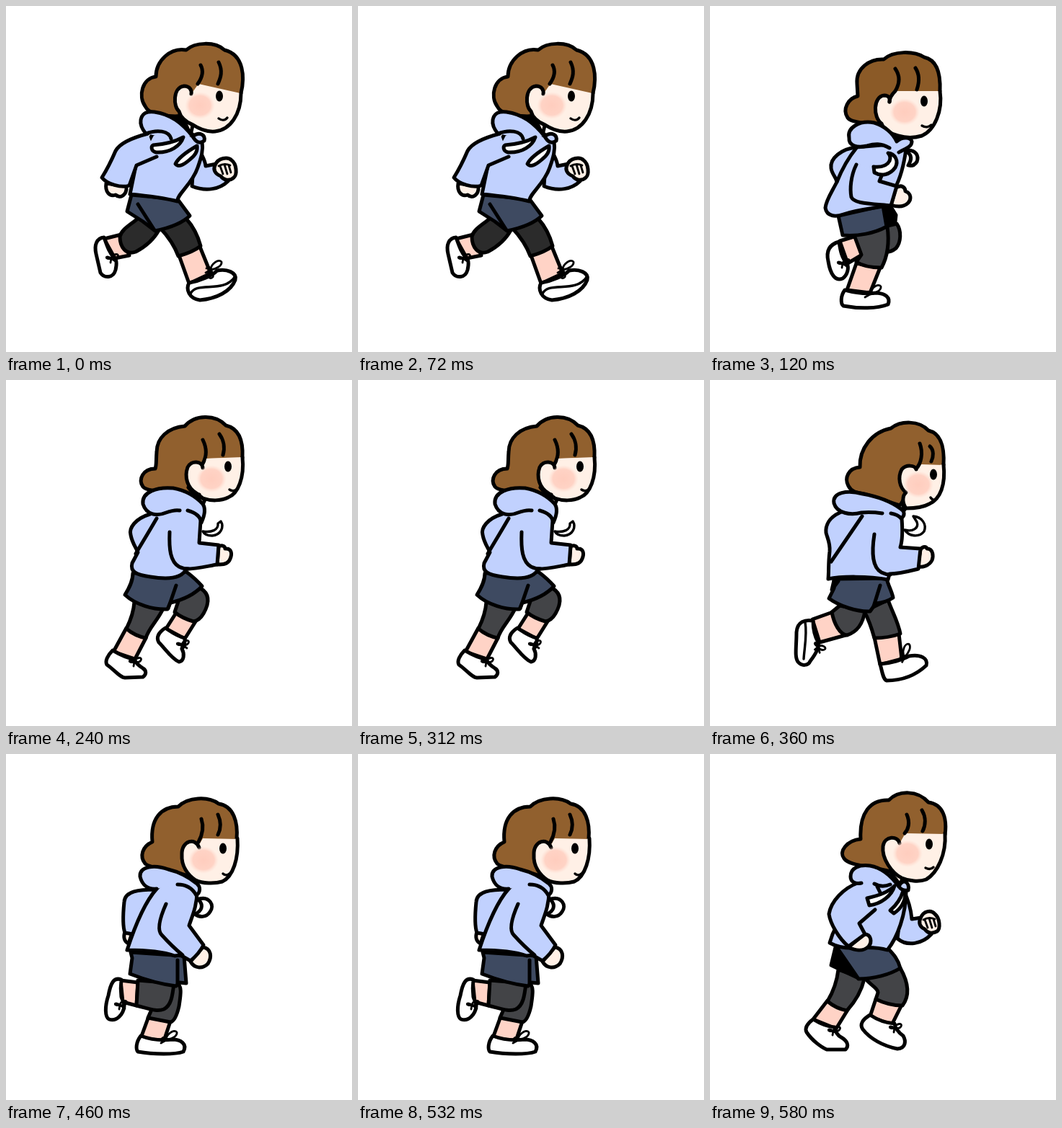
An HTML page without scripts that plays this animation: 480 px wide and 480 px high, repeating every 0.7 s.

```html
<!DOCTYPE html>
<html lang="en">
<head>
<meta charset="utf-8">
<title>Runner</title>
<style>
html, body { margin: 0; width: 100%; height: 100%; overflow: hidden; background: #fff; }
svg { display: block; width: 100vw; height: 100vh; }
path { stroke: #000; stroke-width: 5; stroke-linecap: round; stroke-linejoin: round; fill: none; }
.hair { fill: #91602e; }
.face { fill: #fff0e6; }
.skin { fill: #ffd3c6; }
.top { fill: #c1d1fe; }
.shorts { fill: #3e4a61; }
.tight { fill: #434447; }
.dark { fill: #2b2b2b; }
.black { fill: #000; }
.white { fill: #fff; }
.brow { stroke: none; fill: #fff0e6; }
.thin { stroke-width: 3.4; }
.fine { stroke-width: 2.8; }
.pose { visibility: hidden; animation: show 700ms step-end infinite; }
.short { animation-name: show-short; }
@keyframes show { 0% { visibility: visible; } 17.1429%, 100% { visibility: hidden; } }
@keyframes show-short { 0% { visibility: visible; } 14.2857%, 100% { visibility: hidden; } }
</style>
</head>
<body>
<svg viewBox="0 0 480 480">
<defs>
  <radialGradient id="blush">
    <stop offset="0" stop-color="#ffcdbe"/>
    <stop offset=".7" stop-color="#ffd3c5"/>
    <stop offset="1" stop-color="#ffe0d4" stop-opacity="0"/>
  </radialGradient>
  <ellipse id="eye" rx="5" ry="7.4"/>
  <ellipse id="cheek" rx="21" ry="19" fill="url(#blush)"/>
  <path id="lace" class="fine" d="M0 0C-9-6-9 3 0 0C2-7 12-7 9-2C7 1 3 1 0 0L-1 6M0 0L7 5"/>
  <path id="loops" class="fine" d="M-6-2C-3-5-1-4 0 0C0-8 11-16 15-11C16-6 8-1 0 0L-7 4"/>
  <path id="fingers" class="fine" d="M-1 0C4-3 10-3 15-1M1 0L5 11M7-2L11 11M13-1L16 9"/>
</defs>

<!-- long stride -->
<g class="pose" style="animation-delay:0ms">
  <path class="top" d="M262 190C270 203 276 213 277 222L292 219C294 232 299 239 308 243C297 254 278 258 258 250Z"/>
  <path class="face" d="M290 221C294 210 308 209 313 214C320 219 321 234 316 238C310 244 301 241 298 236C290 233 287 227 290 221Z"/>
  <use href="#fingers" x="296" y="222"/>
  <path class="skin" d="M160 317L136 323L151 350L171 346Z"/>
  <path class="dark" d="M184 294C172 304 160 310 158 320C158 335 167 346 180 341C195 333 206 322 212 311Z"/>
  <path class="white" d="M136 321C126 322 122 331 125 344L131 370C136 378 149 378 152 366C154 357 153 351 150 349C143 342 140 332 136 321Z"/>
  <use href="#lace" x="146" y="350"/>
  <path class="skin" d="M240 346L254 385L284 371L269 334Z"/>
  <path class="dark" d="M214 308C227 322 234 333 239 347C250 344 261 340 270 333C266 318 259 305 250 295Z"/>
  <path class="white" d="M254 384C249 393 254 406 269 408C292 406 312 396 318 380C321 370 306 364 293 367C286 374 271 381 254 384Z"/>
  <path class="thin" d="M256 399C265 381 302 400 318 375"/>
  <use href="#loops" x="284" y="366"/>
  <path class="fine" d="M284 366C276 373 283 381 287 376C289 372 286 369 284 366"/>
  <path class="shorts" d="M174 262L168 285L190 299L207 312C226 308 245 301 255 291L238 268Z"/>
  <path d="M183 275L206 311"/>
  <path class="face" d="M139 246C137 258 144 265 152 262C159 268 168 262 167 250Z"/>
  <path class="top" d="M203 178L180 222L172 261C193 263 218 266 238 271C236 262 258 248 266 224C271 210 274 200 272 188L240 164Z"/>
  <path class="top" d="M209 209L181 221L171 249C160 253 140 247 133 238C140 227 146 215 152 201C158 190 174 183 197 177"/>
  <path class="black" d="M230 146L246 150L258 180L242 162Z"/>
  <path class="face" d="M244 152L259 166L256 179Z"/>
  <path class="hair" d="M326 121C331 100 331 68 303 61C290 49 262 50 250 61C228 57 208 76 208 98C189 100 183 125 193 139C198 149 210 152 235 153L245 152"/>
  <path class="brow" d="M257 122L267 108L325 121L312 145H262Z"/>
  <path class="face" d="M326 121C326 150 311 172 290 174C279 175 267 170 258 164C249 161 242 154 240 146C232 140 231 113 247 111C255 111 258 117 257 122"/>
  <path d="M270 82C275 91 271 101 266 108M295 78C301 90 298 99 294 108"/>
  <path class="brow" d="M259 124L268 110L318 121L312 145H262Z"/>
  <use href="#cheek" x="269" y="138"/><use href="#eye" x="296" y="125"/>
  <path class="thin" d="M295 156C299 159 304 159 307 155"/>
  <path class="top" d="M194 177C189 171 186 164 187 158C189 148 196 146 206 147C228 150 244 162 259 181C268 174 277 178 275 187C268 192 263 188 259 181"/>
  <path class="top" d="M194 177C210 171 226 173 229 184"/>
  <path class="white" d="M204 193C218 192 233 189 246 182C242 194 228 204 208 203C201 201 201 195 204 193Z"/>
  <path class="white" d="M265 194C251 202 239 211 235 219C239 224 246 221 255 213C263 207 266 200 265 194Z"/>
</g>

<!-- low, knees together -->
<g class="pose" style="animation-delay:-580ms">
  <path class="tight" d="M242 306L259 302C266 312 265 328 258 336C252 341 246 342 240 341Z"/>
  <path class="skin" d="M180 326L203 319L211 345L191 357Z"/>
  <path class="white" d="M179 327C165 331 161 341 164 354C167 373 174 382 184 378C191 373 193 363 190 357C183 350 181 340 179 327Z"/>
  <use href="#lace" x="184" y="357"/>
  <path class="skin" d="M203 357L190 394L222 398L236 363Z"/>
  <path class="tight" d="M200 318L210 345L203 355C212 361 225 363 238 363C246 348 249 328 246 306Z"/>
  <path class="white" d="M187 394C181 402 181 413 185 416C206 420 232 420 247 414C251 404 243 399 231 398C215 400 202 398 187 394Z"/>
  <use href="#loops" x="222" y="400"/>
  <path class="black" d="M240 278L250 277L258 290L257 299L244 306Z"/>
  <path class="shorts" d="M178 291L184 318C205 320 229 315 245 306L240 277Z"/>
  <path class="face" d="M258 252C266 247 271 252 271 257C280 260 279 269 275 273C268 280 257 278 251 276Z"/>
  <path class="top" d="M203 196C183 198 166 211 168 225C169 233 175 238 176 244C169 258 161 269 160 280C162 292 174 293 185 289C206 282 226 281 245 277L259 248C265 235 270 218 273 190Z"/>
  <path d="M203 197C190 213 182 229 176 244"/>
  <path class="top" d="M203 220C195 236 194 254 196 265C200 274 218 274 251 277L259 250L235 243L239 233"/>
  <path class="face" d="M238 164L261 180L257 190Z"/>
  <path class="hair" style="fill:#8b5a27" d="M319 118C320 95 316 75 297 71C283 62 254 62 241 74C222 73 202 86 204 108L205 125C192 128 183 143 191 155C196 162 213 161 240 168"/>
  <path class="brow" d="M249 133L257 118L318 118L308 145H255Z"/>
  <path class="face" d="M319 118C323 145 312 172 294 180C284 183 271 183 261 180C249 177 240 170 238 163C226 155 226 125 242 124C248 124 250 128 249 133"/>
  <path d="M257 87C264 97 263 108 257 118C252 123 249 127 249 133M285 86C291 95 290 107 287 116"/>
  <path class="brow" d="M253 133L260 119L312 119L308 145H255Z"/>
  <use href="#cheek" x="270" y="147"/><use href="#eye" x="297" y="132"/>
  <path class="thin" d="M294 166C299 169 304 168 307 165"/>
  <path class="top" d="M249 197C237 190 228 191 218 194C204 197 192 194 193 183C190 169 207 158 228 162C242 166 254 177 259 188C268 180 279 183 280 188C280 196 270 198 262 203"/>
  <path class="white" d="M274 200C286 200 290 208 287 216C283 222 278 222 275 221C280 213 280 207 274 203Z"/>
  <path class="white" d="M247 204C257 205 262 215 257 224C250 234 238 237 228 231L227 223C238 224 246 221 249 215C251 210 250 207 247 204Z"/>
</g>

<!-- pushing off -->
<g class="pose" style="animation-delay:-460ms">
  <path class="skin" d="M236 323L222 345L248 359L263 335Z"/>
  <path class="tight" d="M270 289C283 297 282 310 274 324C270 331 266 334 260 335C250 332 241 328 234 322L240 304Z"/>
  <path class="white" d="M221 344C212 350 208 357 212 364C222 374 230 387 240 391C247 390 248 380 244 373C249 367 248 362 248 358C238 356 230 350 221 344Z"/>
  <use href="#lace" x="244" y="367"/>
  <path class="skin" d="M167 344L149 377L179 387L194 358Z"/>
  <path class="tight" d="M178 308C177 323 172 335 167 345C174 351 184 356 194 358C198 344 211 333 218 317Z"/>
  <path class="white" d="M148 375C141 382 137 390 140 395C150 402 159 413 165 413L190 412C195 408 195 403 190 400C184 396 180 393 178 387C169 386 158 381 148 375Z"/>
  <use href="#lace" x="178" y="391"/>
  <path class="shorts" d="M176 268C176 280 170 290 165 298C180 312 205 319 224 318L228 309C245 305 262 297 272 286C265 278 258 272 250 266Z"/>
  <path d="M236 285L225 317"/>
  <path class="face" d="M295 231C300 228 304 231 304 234C313 233 314 241 311 248C308 256 300 256 293 256Z"/>
  <path class="top" d="M200 186C180 192 170 205 173 215C175 226 180 232 183 239L175 254C172 266 180 270 200 273C224 277 244 276 250 262C265 262 280 258 293 256L295 229L268 226L270 195L268 173L215 165Z"/>
  <path d="M209 192C198 211 187 229 180 241M227 211C226 235 228 252 240 259C244 261 248 262 253 262"/>
  <path class="face" d="M262 158L276 166L272 175Z"/>
  <path class="hair" d="M328 108C329 90 326 68 305 63C290 47 262 48 248 64C225 66 209 80 209 100C208 112 209 118 207 123C190 123 183 138 190 148C196 156 230 154 266 161"/>
  <path class="brow" d="M272 122L277 109L327 107L318 135H275Z"/>
  <path class="face" d="M328 107C331 135 322 158 308 163C298 168 284 168 273 164L264 157C252 150 247 135 252 121C257 111 272 112 273 122"/>
  <path d="M253 149C257 155 261 157 268 159"/>
  <path d="M273 83C279 95 278 107 273 116M296 75C302 83 304 94 301 104"/>
  <path class="brow" d="M276 122L278 109L321 108L318 135H275Z"/>
  <use href="#cheek" x="285" y="137"/><use href="#eye" x="308" y="120"/>
  <path class="thin" d="M310 152C313 154 317 154 320 152"/>
  <path class="top" d="M252 181C263 184 270 190 271 198C276 187 277 178 273 172C262 160 248 153 232 150C210 148 188 155 190 172C195 188 210 189 222 184C230 181 236 180 241 181"/>
  <path class="white thin" d="M298 196C303 204 298 215 286 216C280 216 275 214 273 210C285 212 295 208 294 199Z"/>
</g>

<!-- reaching stride -->
<g class="pose short" style="animation-delay:-340ms">
  <path class="skin" d="M170 322L142 332L152 364L188 354Z"/>
  <path class="tight" d="M180 313L169 322C172 338 180 353 190 354C203 350 212 340 215 320Z"/>
  <path class="white" d="M143 334C132 332 121 335 120 350C120 370 117 384 122 391C127 397 136 397 139 390C146 381 152 371 150 364C145 355 143 345 143 334Z"/>
  <path class="thin" d="M132 336C135 353 131 371 130 387"/>
  <use href="#lace" x="150" y="370" transform="rotate(40 150 370)"/>
  <path class="skin" d="M228 357L236 395L266 387L262 352Z"/>
  <path class="tight" d="M214 321C221 334 225 347 228 358C240 358 253 356 264 352C261 335 252 320 247 305Z"/>
  <path class="white" d="M236 394C239 405 240 415 245 417C265 417 285 410 300 396C303 386 292 380 276 383C267 388 251 393 236 394Z"/>
  <use href="#loops" x="270" y="384" transform="rotate(-35 270 384)"/>
  <path class="shorts" d="M172 276L172 289L165 303C180 314 205 322 222 321L230 310C240 309 248 306 254 302C252 292 247 285 245 275Z"/>
  <path class="black" d="M172 278L178 279L169 291Z"/>
  <path d="M236 285L227 314"/>
  <path class="face" d="M292 235C296 230 300 231 301 234C310 234 310 245 308 250C304 258 295 260 288 259Z"/>
  <path class="top" d="M180 184C165 191 160 202 161 212C163 220 167 226 166 238C164 254 165 265 164 276C182 272 220 272 247 277L249 269C263 269 277 265 289 262L292 234L264 232C268 220 267 205 266 192L262 181L210 172Z"/>
  <path d="M211 189L168 252M228 214C224 240 225 260 238 267C242 269 246 270 250 270"/>
  <path class="face" d="M268 158L273 175L268 183Z"/>
  <path class="hair" d="M324 118C325 100 324 75 303 70C290 56 265 56 251 67C225 72 207 95 208 121C192 122 186 136 192 147C197 156 204 156 214 158L263 174C269 168 270 162 272 156"/>
  <path class="brow" d="M286 124L293 117L323 118L312 145H285Z"/>
  <path class="face" d="M324 117C327 145 320 165 304 172C295 177 283 178 272 178C266 170 267 160 272 156C263 150 260 135 266 124C272 117 284 118 286 124"/>
  <path d="M291 88C296 101 293 116 286 123M305 92C311 97 310 107 307 113"/>
  <path class="brow" d="M289 125L294 118L318 118L312 145H285Z"/>
  <use href="#cheek" x="289" y="145"/><use href="#eye" x="310" y="131"/>
  <path class="thin" d="M306 163C308 166 310 167 312 167"/>
  <path class="top" d="M251 185C257 186 262 188 265 192C271 188 270 182 265 179C252 169 235 162 212 158C190 152 169 156 172 171C176 185 195 188 210 184C222 183 232 184 239 185"/>
  <path class="white thin" d="M282 189C294 190 301 200 297 210C290 219 276 217 270 208C282 211 290 205 287 197Z"/>
</g>

<!-- low, rear foot up -->
<g class="pose" style="animation-delay:-240ms">
  <path class="skin" d="M198 364L187 394L219 398L228 371Z"/>
  <path class="tight" d="M237 318C245 321 242 336 240 350C237 363 233 371 228 372L197 366L203 352Z"/>
  <path class="white" d="M187 391C180 400 180 410 183 413C205 417 235 417 246 413C252 402 242 396 231 396C215 398 200 396 187 391Z"/>
  <use href="#loops" x="222" y="397"/>
  <path class="skin" d="M183 317L159 314L162 344L181 349Z"/>
  <path class="tight" d="M183 314L181 349C198 353 209 358 219 354C229 349 231 336 233 318Z"/>
  <path class="white" d="M160 313C149 309 145 319 142 335C137 350 137 365 143 368C154 372 163 360 164 350C164 344 161 341 160 337C159 329 159 321 160 313Z"/>
  <use href="#lace" x="158" y="348"/>
  <path class="shorts" d="M173 275L175 283L172 305C195 314 220 320 236 322L240 317L250 318L247 280Z"/>
  <path d="M238 286V320"/>
  <path class="face" d="M165 247C162 255 165 261 170 263L175 248Z"/>
  <path class="top" d="M207 188C185 188 165 190 164 205C162 225 162 240 165 248L176 250Z"/>
  <path class="face" d="M273 268C285 270 286 282 280 291C272 299 261 297 256 288Z"/>
  <path class="top" d="M209 187C193 205 180 235 168 272C190 272 217 274 234 280L242 279L256 287C263 281 270 273 274 265L254 238C258 225 265 212 265 190L262 180L225 172Z"/>
  <path d="M222 208C214 226 209 244 216 251C225 261 234 270 245 279"/>
  <path class="face" d="M248 160L266 175L262 182Z"/>
  <path class="hair" d="M320 118C322 95 316 72 295 69C280 58 252 60 239 73C215 73 200 90 203 122C189 128 185 142 193 152C201 160 230 160 255 170"/>
  <path class="brow" d="M266 129L273 117L320 118L310 145H265Z"/>
  <path class="face" d="M321 117C323 145 315 170 300 177C290 180 272 180 263 175C252 168 243 155 244 140C243 120 263 115 268 130"/>
  <path d="M271 90C275 102 272 113 267 122M294 84C299 95 298 104 294 112"/>
  <path class="brow" d="M271 130L274 118L314 118L310 145H268Z"/>
  <use href="#cheek" x="274" y="147"/><use href="#eye" x="301" y="131"/>
  <path class="thin" d="M301 166C304 169 308 168 310 166"/>
  <path class="white" d="M268 201C282 197 290 210 283 219C278 227 268 227 262 222C272 218 274 210 268 203Z"/>
  <path class="top" d="M238 181C250 181 259 187 264 196C270 192 270 184 265 180C254 171 242 164 225 160C205 153 185 156 186 170C189 183 198 188 209 187"/>
</g>

<!-- rising, arms swung -->
<g class="pose" style="animation-delay:-120ms">
  <path class="top" d="M268 188C275 202 279 217 280 229L293 227C294 238 298 245 307 250C295 263 274 268 260 256Z"/>
  <path class="face" d="M292 228C296 217 307 216 312 222C319 228 320 242 315 246C308 250 301 248 298 243C291 240 289 234 292 228Z"/>
  <use href="#fingers" x="297" y="230"/>
  <path class="skin" d="M230 340L222 364L252 376L266 348Z"/>
  <path class="tight" d="M216 312C222 320 233 325 233 331L230 340C242 346 254 349 267 349C276 337 277 320 264 297Z"/>
  <path class="white" d="M222 362C212 368 207 375 212 382C222 395 240 405 260 409C272 408 272 398 268 391C261 386 257 381 256 374C242 373 231 368 222 362Z"/>
  <use href="#lace" x="256" y="380"/>
  <path class="skin" d="M163 342L143 368L175 381L191 355Z"/>
  <path class="tight" d="M178 299C176 317 169 333 163 343C171 350 180 354 190 356C200 345 210 330 214 312Z"/>
  <path class="white" d="M143 368C135 374 131 380 134 386C142 398 155 407 162 410H188C193 405 191 398 182 393C176 390 174 385 173 379C161 378 151 373 143 368Z"/>
  <use href="#lace" x="171" y="384"/>
  <path class="black" d="M174 268L168 293L206 311L190 275Z"/>
  <path class="shorts" d="M175 267L206 312C227 312 250 306 264 297C261 285 255 278 246 269Z"/>
  <path class="top" d="M203 180L170 250L166 262C177 268 190 270 203 269C219 268 234 268 246 272C260 255 272 222 272 190L240 166Z"/>
  <path class="face" d="M214 250C224 250 225 261 220 267C212 275 200 272 192 268Z"/>
  <path class="top" d="M229 216L207 235L215 250L192 267C179 256 167 236 165 222C168 204 185 186 207 178"/>
  <path class="face" d="M246 158L267 172L264 182Z"/>
  <path class="hair" d="M326 112C329 90 324 70 303 67C288 50 262 50 248 64C222 63 207 82 209 118C190 120 178 135 186 145C193 155 220 155 250 163"/>
  <path class="brow" d="M263 124L271 110L325 111L315 140H262Z"/>
  <path class="face" d="M326 110C328 140 315 165 300 174C290 178 275 176 266 172C252 165 238 145 240 128C242 113 261 113 263 124"/>
  <path d="M273 84C278 95 275 105 270 110M294 78C300 88 299 99 295 107"/>
  <path class="brow" d="M266 125L272 112L319 111L315 140H264Z"/>
  <use href="#cheek" x="274" y="138"/><use href="#eye" x="304" y="125"/>
  <path class="thin" d="M299 158C303 160 307 160 310 157"/>
  <path class="top" d="M210 179C201 181 195 177 195 170C195 158 207 153 222 155C240 158 252 170 262 184C267 171 278 178 275 189C270 190 265 188 262 184"/>
  <path d="M228 180C235 184 243 184 250 181M232 184L236 192"/>
  <path class="white" d="M218 200C232 197 248 191 256 183C252 197 237 208 221 210Z"/>
  <path class="white" d="M268 190C264 203 257 211 250 217L255 221C265 215 271 204 271 193Z"/>
</g>
</svg>
</body>
</html>
```
